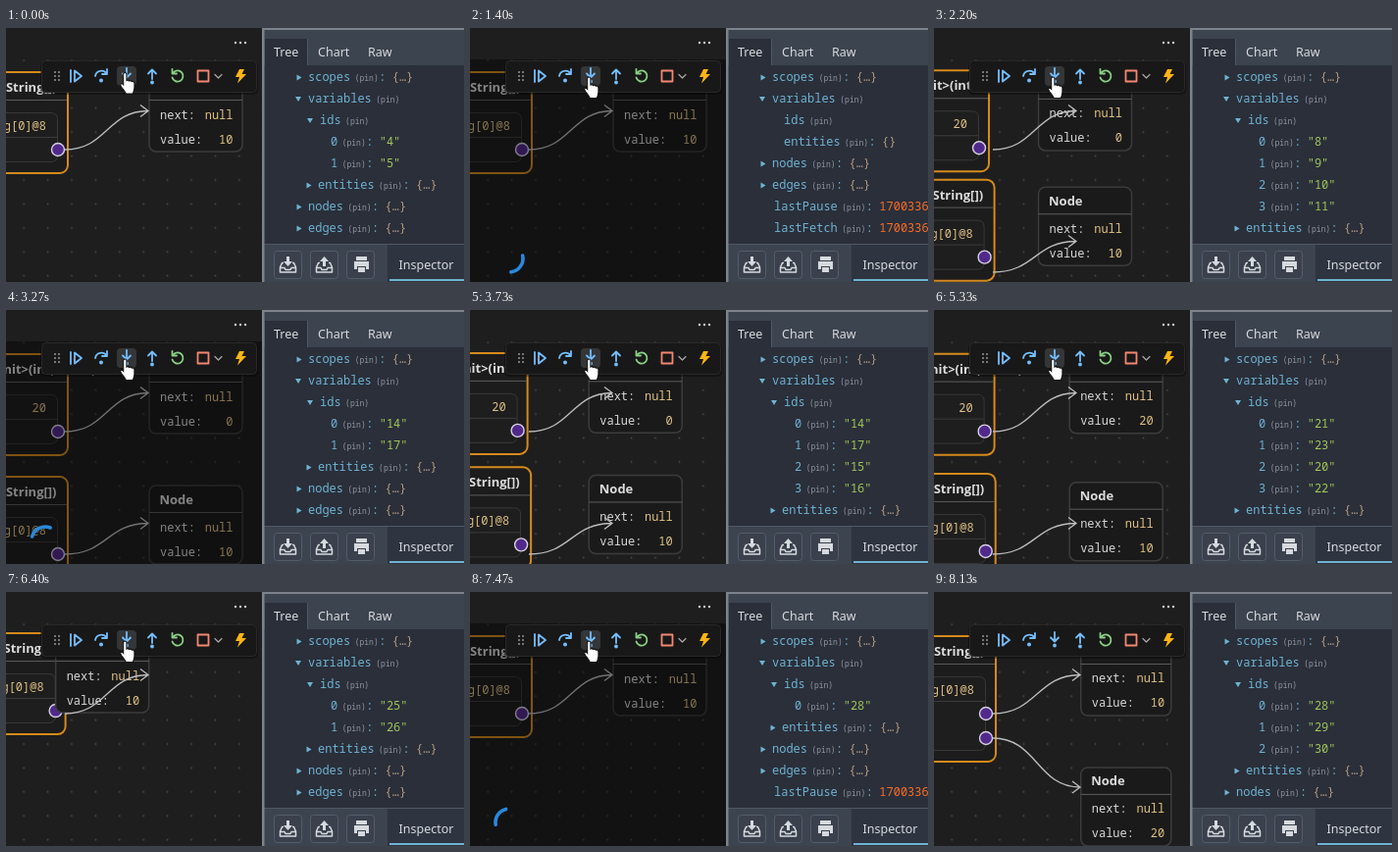
Recreate the animation shown at these times as an HTML page. Size 467x259 px, loop 8470 ms.

```html
<!DOCTYPE html>
<html lang="en">
<head>
<meta charset="utf-8">
<title>Debugger stepping</title>
<style>
  html, body { margin: 0; width: 100%; height: 100%; overflow: hidden; background: #1e1e1e; }
  svg { display: block; }
  text { white-space: pre; }
  .mono { font: 12px "Noto Sans Mono", monospace; }
  .pin { font: 8px "Noto Sans Mono", monospace; fill: #9298a2; }
  .ui { font: 12.5px "Noto Sans", sans-serif; fill: #d8dade; }
  .title { font: bold 13px "Open Sans", sans-serif; fill: #dcdcdc; }
  .label { fill: #d8d8d8; }
  .value { fill: #dfc184; }
  .key { fill: #6fb3d2; }
  .string { fill: #a1c659; }
  .number { fill: #fc6d24; }
  .hint { fill: #b79a80; }
  .end { text-anchor: end; }
  .line { fill: none; stroke-width: 1.8; stroke-linecap: round; stroke-linejoin: round; }
  .node { fill: #1a1a1a; stroke: #3c3c3c; stroke-width: 1.5; }
  .card { fill: #1c1c1c; stroke: #d58a1c; stroke-width: 2; }
  .inner { fill: #1e1e1e; stroke: #383838; }
  .rule { stroke: #3c3c3c; }
  .header { stroke: #5c5c5c; }
  .edge { fill: none; stroke: #bdbdbd; stroke-width: 1.3; }
  .handle { fill: #51298c; stroke: #d6d0e0; stroke-width: 1.4; }
</style>
</head>
<body>
<svg width="467" height="259" viewBox="0 0 467 259">
  <defs>
    <pattern id="dots" x="6" y="20.8" width="24.4" height="24.4" patternUnits="userSpaceOnUse">
      <circle cx="12.2" cy="12.2" r=".9" fill="#4a4a4a"/>
    </pattern>
    <clipPath id="canvasClip"><rect y="32" width="261" height="227"/></clipPath>
    <clipPath id="treeClip"><rect x="264" y="38" width="203" height="182"/></clipPath>
  </defs>

  <rect width="262" height="259" fill="#1e1e1e"/>
  <g clip-path="url(#canvasClip)">
    <rect y="32" width="261" height="227" fill="url(#dots)"/>
    <g id="graph"></g>
    <g id="loading">
      <rect y="32" width="261" height="227" fill="#000" opacity=".4"/>
      <path id="spinner" fill="none" stroke="#2889dc" stroke-width="3.6" stroke-linecap="round"/>
    </g>
  </g>
  <g fill="#d0d0d0">
    <circle cx="234" cy="15" r="1.2"/><circle cx="239" cy="15" r="1.2"/><circle cx="244" cy="15" r="1.2"/>
  </g>

  <rect x="35" y="34" width="222" height="34" rx="5" fill="#000" opacity=".35"/>
  <rect x="36.5" y="33.5" width="219" height="32" rx="4" fill="#181818" stroke="#292929"/>
  <rect id="hover" x="113" y="39" width="20" height="20" rx="4" fill="#343638"/>
  <g id="grip" fill="#777"></g>
  <g class="line" stroke="#75beff">
    <path d="M66 43V55M70 43.5V54.5L77 49Z"/>
    <path d="M91 49A6.3 6.3 0 0 1 102.5 46.5M103 42V47H98"/>
    <path d="M123 41V50M119 46.500L123 50.500L127 46.500"/>
    <path d="M149 52V43M145 46.500L149 42.500L153 46.500"/>
  </g>
  <g fill="#75beff"><circle cx="97" cy="53.5" r="2"/><circle cx="123" cy="54.5" r="1.9"/><circle cx="149" cy="55.5" r="1.9"/></g>
  <path class="line" stroke="#89d185" d="M170.5 45.5A5.6 5.6 0 1 1 169.5 50.5M169.5 42V46.5H174"/>
  <rect class="line" stroke="#f48771" x="195.5" y="43.5" width="11" height="11"/>
  <path class="line" style="stroke-width:1.2" stroke="#aaa" d="M213 47.5L216.5 51L220 47.5"/>
  <path fill="#fdb515" d="M238 42H243L240.5 47H245L236 56.5L238 50H234Z"/>

  <rect x="263" width="204" height="259" fill="#2a2f3a"/>
  <rect x="263" width="204" height="38" fill="#3c444f"/>
  <rect x="263" width="204" height="2" fill="#7d828b"/>
  <rect x="264" y="11" width="43" height="27" fill="#2a2f3a"/>
  <path d="M307.500 11V38" stroke="#4f5a65"/>
  <text class="ui" x="273" y="28.5">Tree</text>
  <text class="ui" x="318" y="28.5">Chart</text>
  <text class="ui" x="369" y="28.5">Raw</text>
  <g id="tree" clip-path="url(#treeClip)"></g>

  <rect x="263" y="221" width="204" height="38" fill="#3c444f"/>
  <path d="M263 220.5H467" stroke="#4f5a65"/>
  <g id="buttons" fill="#3a414c" stroke="#535d69"></g>
  <g fill="none" stroke="#d6d9de" stroke-width="1.5" stroke-linejoin="round">
    <path id="tray" d="M283 239.500H281.500L279.500 244V249H295.500V244L293.500 239.500H292M279.500 244.500H284L285 246.500H290L291 244.500H295.500"/>
    <use href="#tray" x="37"/>
  </g>
  <g fill="#d6d9de">
    <path d="M286 233H289V238H292L287.5 243L283 238H286Z"/>
    <path d="M323 243V238H320L324.5 233L329 238H326V243Z"/>
    <path d="M357 233H368V237H357ZM355 238H370V246H367V243H358V246H355ZM359 244H366V249H359Z"/>
  </g>
  <rect x="389" y="221" width="78" height="38" fill="#2e3440"/>
  <rect x="391" y="256" width="76" height="2" fill="#6fb3d2"/>
  <text class="ui" x="400.5" y="245.5">Inspector</text>
  <rect x="261" width="2.5" height="259" fill="#7d828b"/>

  <path id="cursor" fill="#fff" stroke="#111" stroke-width="1"
    d="M3 1.500Q4.500-.5 6 1.500V8Q7.500 7 8.500 8.500Q10 7.500 11 9Q13 8.500 13.500 10.500V15Q13 18 12 20.500H5.500Q4 17.500 1 14Q-.5 11.500 1 11Q2 10.800 3 12Z"/>
</svg>

<script>
const LOOP = 8470, ANIMATION = 443;
const $ = id => document.getElementById(id);

// Each step: loading start, layout start, ids in order of arrival, graph.
const single = (offset = [0, 0], cardOffset = [0, 0]) => ({
  cards: [{ y: 45, title: 'String[])', handles: 1, offset: cardOffset }],
  nodes: [{ x: 146, y: 46, value: 10, offset }],
  edges: [[124, 146, 84.5]]
});
const constructing = value => ({
  cards: [
    { y: 45, title: '<init>(int, Node)', field: 20, handles: 1, offset: [-20, -5] },
    { y: 170, title: 'String[])', handles: 1, offset: [-4, -44] }
  ],
  nodes: [
    { x: 146, y: 46, value, offset: [-113, -3] },
    { x: 146, y: 179, value: 10, offset: [-113, -48] }
  ],
  edges: [[124, 146, 84.5], [249, 146, 217.5]]
});
const pair = {
  cards: [{ y: 45, title: 'String[])', handles: 2, offset: [-4, -5] }],
  nodes: [
    { x: 150, y: 46, width: 92, value: 10, offset: [-160, -5] },
    { x: 150, y: 179, width: 92, value: 20, offset: [-160, -60] }
  ],
  edges: [[124, 150, 84.5], [149, 150, 199]]
};
const steps = [
  { load: -2000, layout: -1000, ids: [4, 5], graph: single() },
  { load: 1270, layout: 2070, ids: [8, 9, 10, 11], graph: constructing(0) },
  { load: 2730, layout: 3555, ids: [14, 17, 15, 16], graph: constructing(0) },
  { load: 4270, layout: 5070, ids: [21, 23, 20, 22], graph: constructing(20) },
  { load: 5670, layout: 6330, ids: [25, 26], graph: single([-161, -5], [-4, -5]) },
  { load: 7000, layout: 7740, ids: [28, 29, 30], graph: pair }
];

const text = (cls, x, y, content) =>
  `<text class="${cls}" x="${x}" y="${y}">${String(content).replace(/</g, '&lt;')}</text>`;

function cardMarkup({ y, title, field, handles }) {
  const rows = handles * 25;
  let out = `<rect class="card" x="-120" y="${y}" width="183" height="${78 + rows}" rx="8"/>`
    + `<path class="header" d="M-120 ${y + 28.5}H62"/>`
    + `<rect class="inner" x="-100" y="${y + 41.5}" width="152.5" height="${25 + rows}" rx="6"/>`
    + `<path class="rule" d="M-100 ${y + 66.5}H52"/>`
    + (field ? text('title', -14, y + 20, title) : text('title end', 51.5, y + 20, title))
    + text('mono value end', 41, y + 59, field || 'String[0]@8');
  for (let i = 0; i < handles; i++) out += `<circle class="handle" cx="53" cy="${y + 79 + i * 25}" r="6.5"/>`;
  return out;
}

function nodeMarkup({ x, y, width = 95, value }) {
  return `<rect class="node" x="${x}" y="${y}" width="${width}" height="80" rx="7"/>`
    + `<path class="header" d="M${x} ${y + 27.5}h${width}"/>`
    + text('title', x + 10.5, y + 18.5, 'Node')
    + text('mono label', x + 11, y + 46.5, 'next:') + text('mono value end', x + 85.5, y + 46.5, 'null')
    + text('mono label', x + 11, y + 71.5, 'value:') + text('mono value end', x + 85.5, y + 71.5, value);
}

function edgeMarkup([startY, endX, endY]) {
  const mid = (60 + endX) / 2;
  return `<path class="edge" d="M60 ${startY}C${mid} ${startY} ${mid} ${endY} ${endX - 1} ${endY}`
    + `m-8-6l8 6l-8 6"/>`;
}

function buildGraph({ cards, nodes, edges }) {
  const group = inner => `<g class="moving">${inner}</g>`;
  return cards.map(c => group(cardMarkup(c))).join('')
    + nodes.map(n => group(nodeMarkup(n))).join('')
    + edges.map(edgeMarkup).join('');
}

function treeMarkup(ids) {
  const full = ids.length > 0;
  const rows = [
    [308, 'scopes', 'hint', '{…}', 'closed'],
    [308, 'variables', '', '', 'open'],
    [320, 'ids', '', '', full && 'open'],
    ...ids.map((id, i) => [331, i, 'string', `"${id}"`]),
    full ? [318, 'entities', 'hint', '{…}', 'closed'] : [320, 'entities', 'hint', '{}'],
    [308, 'nodes', 'hint', '{…}', 'closed'],
    [308, 'edges', 'hint', '{…}', 'closed'],
    [310, 'lastPause', 'number', '1700336412873'],
    [310, 'lastFetch', 'number', '1700336412905']
  ];
  return rows.slice(0, 8).map(([x, key, cls, value, arrow], i) => {
    const y = 54 + i * 22, pin = x + String(key).length * 7.2 + 4.5;
    const shape = arrow === 'open' ? `M${x - 13} ${y - 6}h6l-3 5z` : `M${x - 11.5} ${y - 6.5}l5 3l-5 3z`;
    return (arrow ? `<path class="key" d="${shape}"/>` : '')
      + text('mono key', x, y, key) + text('pin', pin, y - .5, '(pin)')
      + (value ? text('mono key', pin + 24.5, y, ':') + text('mono ' + cls, pin + 38, y, value) : '');
  }).join('');
}

function visibleIds(t, index) {
  const age = t - steps[index].load;
  if (age < 90) return steps[index - 1].ids;
  return steps[index].ids.filter((_, i) => age >= 430 + i * 70);
}

function spinnerPath(age) {
  const head = 184 + .51 * (age - 330);
  const length = 75 + 20 * Math.sin((age - 435) / 210 * Math.PI);
  const point = deg => {
    const a = deg * Math.PI / 180;
    return `${40 + 14 * Math.cos(a)} ${235 + 14 * Math.sin(a)}`;
  };
  return `M${point(head - length)}A14 14 0 0 1 ${point(head)}`;
}

function cursorPosition(t) {
  if (t < 330) return [116.5, 45];
  if (t < 400) return [208, 63.5];
  if (t < 600) return [116.5, 48.5];
  return [116.5, 49.5];
}

const shown = {};
function update(id, key, markup) {
  if (shown[id] === key) return;
  shown[id] = key;
  $(id).innerHTML = markup();
}

const lastIndex = test => steps.reduce((found, step, i) => test(step) ? i : found, 0);

function render(t) {
  const loadIndex = lastIndex(s => t >= s.load);
  const layoutIndex = lastIndex(s => t >= s.layout);
  const { graph, layout } = steps[layoutIndex];

  update('graph', layoutIndex, () => buildGraph(graph));
  const rest = Math.max(0, 1 - (t - layout) / ANIMATION) ** 3;
  const parts = [...graph.cards, ...graph.nodes];
  document.querySelectorAll('.moving').forEach((el, i) => {
    const [dx, dy] = parts[i].offset;
    el.setAttribute('transform', `translate(${dx * rest} ${dy * rest})`);
  });

  const busy = loadIndex > layoutIndex;
  $('loading').style.display = busy ? '' : 'none';
  if (busy) $('spinner').setAttribute('d', spinnerPath(t - steps[loadIndex].load));

  const ids = visibleIds(t, loadIndex);
  update('tree', ids.join(), () => treeMarkup(ids));

  const pointing = t < 7500;
  $('cursor').style.display = $('hover').style.display = pointing ? '' : 'none';
  $('cursor').setAttribute('transform', `translate(${cursorPosition(t)}) scale(1.07)`);
}

$('grip').innerHTML = [0, 1, 2, 3, 4, 5].map(i =>
  `<rect x="${49 + i % 2 * 4}" y="${44 + (i >> 1) * 4}" width="2" height="2"/>`).join('');
$('buttons').innerHTML = [273.5, 310.5, 347.5].map(x =>
  `<rect x="${x}" y="227.5" width="28" height="28" rx="3"/>`).join('');

const start = performance.now();
function tick() {
  render((performance.now() - start) % LOOP);
  requestAnimationFrame(tick);
}
tick();
</script>
</body>
</html>
```
